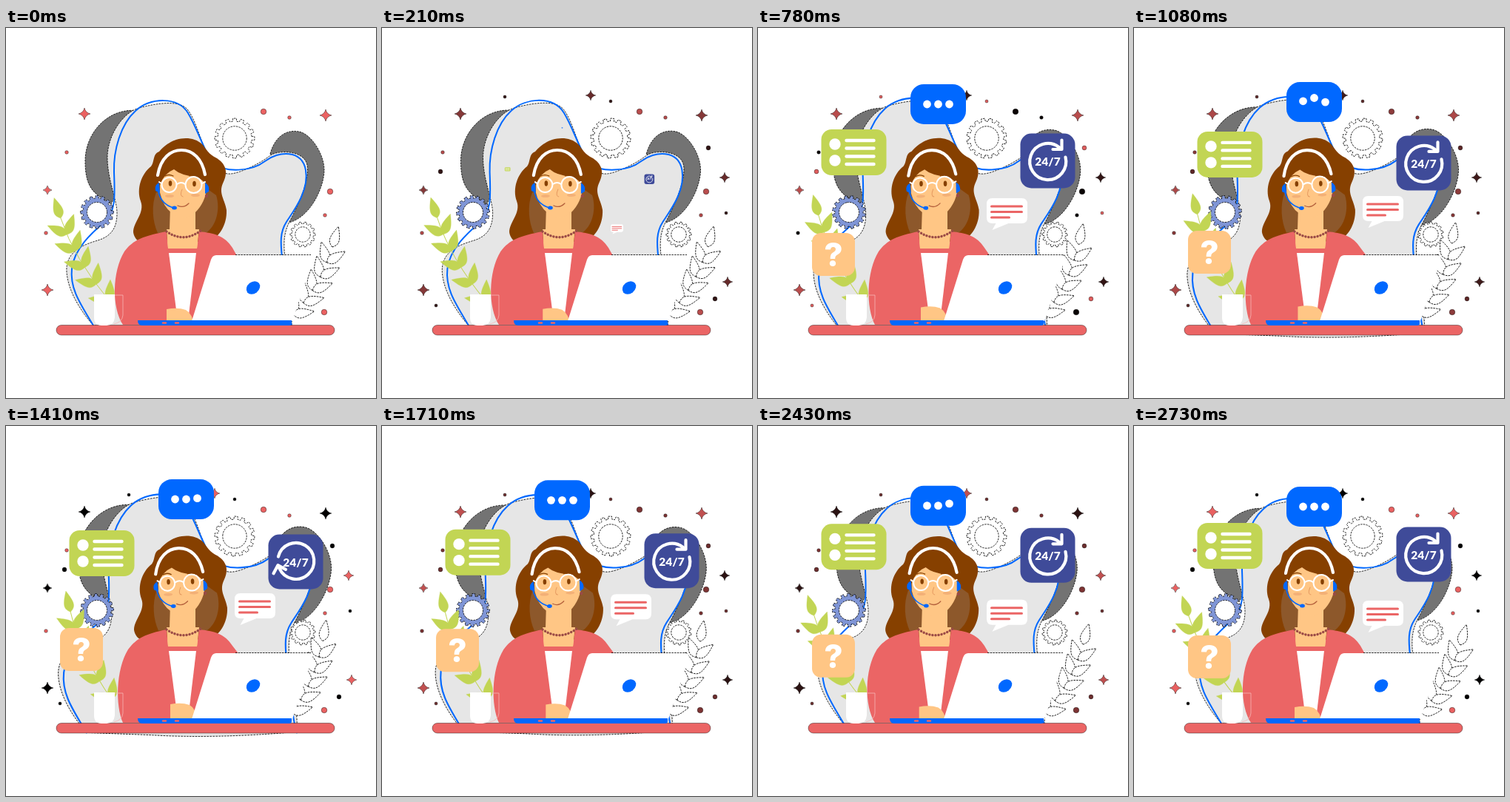
Animation, 500 px wide and 500 px high, one loop 2.76 s. Source, as an HTML page:

```html
<!DOCTYPE html>
<html lang="en">
<head>
<meta charset="utf-8">
<title>Support desk</title>
<style>
html, body { margin: 0; width: 100%; height: 100%; overflow: hidden; background: #fff; }
svg { display: block; width: 100vw; height: 100vh; }
.edge { stroke: #000; stroke-width: .8; stroke-dasharray: 2.5 1.2; }
.thin { stroke: #000; stroke-width: .4; }
.line { fill: none; stroke-linecap: round; stroke-linejoin: round; }
.card { transform-box: fill-box; }
text { fill: #fff; text-anchor: middle; }
</style>
</head>
<body>
<svg viewBox="0 0 500 500">
  <g id="blob">
    <g class="edge" fill="#737373">
      <path d="M180 112C140 106 107 140 107 180S122 225 142 238L170 180Z"/>
      <path d="M357 170C364 145 380 137 396 140S430 170 430 192S412 256 382 263L380 200Z"/>
    </g>
    <path class="edge" fill="#e6e6e6" d="M118 402C104 386 84 358 82 330S104 293 124 287S150 268 150 250S137 205 137 175S158 114 180 108S235 96 246 111S262 150 272 170S291 198 304 197S345 182 356 173S403 165 407 185S393 243 385 258S374 285 377 310S388 380 386 401Q280 410 200 405Z"/>
    <path class="line" stroke="#0068ff" stroke-width="2" d="M118 402C100 372 86 352 89 325S117 276 133 262S147 225 146 195S155 130 175 112S232 92 246 115S268 170 282 183S332 194 350 180S400 164 405 192S388 248 379 262S371 290 373 310S380 385 386 402"/>
  </g>
  <g id="sparks" class="thin"></g>
  <g id="gears" class="edge"></g>
  <g id="plantL" fill="#c2d554" stroke="#c2d554" stroke-width=".3"></g>
  <g id="plantR" class="edge" fill="#fff"></g>

  <g id="hair">
    <path fill="#864000" d="M243 149C225 149 213 160 207 167C198 170 201 181 196 187C183 197 176 217 182 234C188 250 172 262 172 276C174 290 188 294 205 294L272 288C287 286 299 266 298 246C296 232 287 224 293 210C299 198 300 186 285 176C274 171 270 163 266 158C259 151 251 149 243 149Z"/>
    <path fill="#8d582b" d="M203 222C196 240 198 262 205 277H270C284 268 290 245 284 226L270 216Z"/>
  </g>

  <g id="body">
    <path fill="#ffc685" d="M222 240H256V273L260 300H216L221 273Z"/>
    <path id="blazer" fill="#eb6565"/>
    <path fill="#ffc685" d="M217 272H261L258 298H219Z"/>
    <path fill="#fff" d="M220 304H257L246 396H232Z"/>
    <path class="line" d="M217 275Q240 291 263 274" stroke="#9a4a45" stroke-width="3.4" stroke-dasharray=".1 4"/>
  </g>

  <g id="head">
    <path fill="#ffc685" d="M208 196V222Q212 241 224 250Q239 263 255 250Q270 236 272 212L250 188H220Z"/>
    <path fill="#864000" d="M202 222C198 189 212 167 236 166C262 167 277 193 274 222Q271 206 256 201Q236 199 227 191Q214 196 208 212Z"/>
    <path class="line" d="M205 199C209 175 223 165 237 165C253 165 265 177 269 198" stroke="#fff" stroke-width="4.2"/>
    <path fill="#0068ff" d="M207 209Q200 212 202 220L208 223ZM269 209Q276 213 274 221L269 224Z"/>
    <circle cx="271" cy="227" r="2.2" fill="#9a4a45"/>
    <g fill="#f3b077"><ellipse cx="221" cy="227" rx="6" ry="2"/><ellipse cx="256" cy="226" rx="6" ry="2"/></g>
    <g fill="#864000"><ellipse cx="222" cy="210" rx="2.3" ry="3.7"/><ellipse cx="254.500" cy="210.500" rx="2.3" ry="3.7"/></g>
    <g class="line" stroke="#fff" stroke-width="2">
      <circle cx="220.500" cy="212" r="10"/><circle cx="253.500" cy="212" r="11"/>
      <path d="M231 211Q237 207 242 211M210 210L207 208M265 210L269 208"/>
    </g>
    <g class="line" stroke="#864000" stroke-width="1.3">
      <path d="M215 200Q220 197 226 200M248 200Q254 197 260 201"/>
      <path d="M232 240Q240 244 247 237" stroke="#b4603c"/>
      <path d="M238 218Q234 227 239 228" stroke="#e59a61" stroke-width="1"/>
    </g>
    <path class="line" d="M206 222Q210 238 226 243" stroke="#0068ff" stroke-width="1.6"/>
    <ellipse cx="227.500" cy="243" rx="3.4" ry="2.5" fill="#0068ff"/>
  </g>

  <path id="hand" fill="#ffc685" d="M217 380Q232 377 243 381Q252 386 254 402H217Z"/>
  <rect class="thin" x="68" y="401.500" width="376" height="13.500" rx="6.800" fill="#eb6565"/>
  <path fill="#fff" d="M284 307H410Q416 308 414 314L387 396H251L277 313Q279 307 284 307Z"/>
  <path class="edge" fill="none" d="M310 306.500H412"/>
  <ellipse cx="334" cy="351" rx="10" ry="7.800" fill="#0068ff" transform="rotate(-38 334 351)"/>
  <path fill="#0068ff" d="M178 395H386V399Q386 402 383 402H184Q178 402 178 395Z"/>
  <path class="line" d="M212 398.500H216M229 398.500H233" stroke="#eb6565" stroke-width="2.400"/>
  <path class="line" d="M147 361H158V388Q157 398 146 400" stroke="#f6b5b5" stroke-width=".8"/>
  <path fill="#fff" d="M119 360H147V391Q146 402 136 402H129Q119 402 119 391Z"/>

  <g transform="translate(336.500 252)"><g class="card" data-float="5" style="transform-origin: left bottom">
    <path fill="#fff" d="M-20 -21H20Q27.500 -21 27.500 -13V5Q27.500 13 20 13H2L-20 22L-15 13H-20Q-27.500 13 -27.500 5V-13Q-27.500 -21 -20 -21Z"/>
    <path class="line" d="M-21 -10H20M-21 -2.500H20M-21 5H3" stroke="#eb6565" stroke-width="3"/>
  </g></g>
  <g transform="translate(391.500 178.500)"><g class="card" data-float="-5" style="transform-origin: left bottom">
    <rect x="-37" y="-37" width="74" height="74" rx="15" fill="#3f4b99"/>
    <path id="ring" class="line" d="M24 -5A24.500 24.500 0 1 1 15 -18.500M19 -28V-15.500H7" stroke="#fff" stroke-width="4.200"/>
    <text y="6.500" font-family="Lato, sans-serif" font-weight="900" font-size="15.500">24/7</text>
  </g></g>
  <g transform="translate(129.500 167)"><g class="card" data-float="-5" style="transform-origin: right bottom">
    <rect x="-44" y="-31" width="88" height="62" rx="14" fill="#c2d554"/>
    <circle cx="-25.500" cy="-11" r="7.700" fill="#fff"/><circle cx="-25.500" cy="11" r="7.700" fill="#fff"/>
    <path class="line" d="M-10 -16H27M-10 -5.500H27M-10 5.500H27M-10 16H27" stroke="#fff" stroke-width="4.400"/>
  </g></g>
  <g transform="translate(243.500 104)"><g class="card" data-float="5" style="transform-origin: center bottom">
    <rect x="-37.500" y="-27" width="75" height="54" rx="18" fill="#0068ff"/>
    <g id="dots" fill="#fff"><circle cx="-15" r="5.400"/><circle r="5.400"/><circle cx="15" r="5.400"/></g>
  </g></g>
  <g transform="translate(102 307)"><g class="card" data-float="5" style="transform-origin: right top">
    <rect x="-29" y="-29" width="58" height="58" rx="12" fill="#ffc685"/>
    <text y="16" font-family="Inter, sans-serif" font-weight="800" font-size="44">?</text>
  </g></g>
</svg>
<script>
const LOOP = 2760, TAU = Math.PI * 2;
const $ = id => document.getElementById(id);
const clamp = x => Math.max(0, Math.min(1, x));
const ease = x => (1 - Math.cos(Math.PI * clamp(x))) / 2;
const set = (el, attrs) => { for (const n in attrs) el.setAttribute(n, attrs[n]); return el; };

function add(parent, tag, attrs) {
  const el = document.createElementNS('http://www.w3.org/2000/svg', tag);
  parent.appendChild(el);
  return set(el, attrs);
}

// Twinkles: two kinds, each with two groups in opposite phase
const star = r => {
  const q = r * .18;
  return `M0 ${-r}Q${q} ${-q} ${r} 0Q${q} ${q} 0 ${r}Q${-q} ${q} ${-r} 0Q${-q} ${-q} 0 ${-r}Z`;
};
const disc = r => `M${-r} 0A${r} ${r} 0 1 1 ${r} 0A${r} ${r} 0 1 1 ${-r} 0Z`;

// Larger marks come first in each list
function twinkle(spots, shape, big, small, period, flip) {
  const el = add($('sparks'), 'g', {});
  spots.split(' ').forEach((p, i) =>
    add(el, 'path', { d: shape(i < 3 ? big : small), transform: `translate(${p})` }));
  return { el, period, flip };
}
const twinkles = [
  twinkle('106,116 432,118 56,354 56,219', star, 8, 6, 920, false),
  twinkle('463,202 467,343 282,91', star, 6.8, 6, 920, true),
  twinkle('348,113 438,221 430,384 431,253 383,121 54,277 82,168', disc, 3.8, 2.3, 1380, false),
  twinkle('79,194 450,366 441,162 166,93 73,375 465,250 309,99', disc, 2.9, 2, 1380, true)
];

function gear(x, y, r, teeth, fill) {
  const el = add($('gears'), 'g', { fill }), pts = [], root = r * .85;
  for (let i = 0; i < teeth; i++)
    [[-.3, root], [-.22, r], [.22, r], [.3, root]].forEach(([o, q]) => {
      const a = (i + o) * TAU / teeth;
      pts.push(q * Math.cos(a), q * Math.sin(a));
    });
  add(el, 'path', { d: 'M' + pts.join(' ') + 'Z' });
  add(el, 'circle', { r: r * .6, fill: '#fff' });
  return { el, x, y };
}
const gears = [
  gear(309, 149, 27, 16, '#fff'),
  gear(401, 279, 17, 14, '#fff'),
  gear(123, 249, 22.5, 16, '#7f95d6')
];

// Leaf pairs along a bent stem from tip to base
function plant(g, tip, bend, base, spread) {
  const leaf = (x, y, a) => add(g, 'path', {
    d: 'M0 0C6 -8 11 -8 29 0C11 8 6 8 0 0Z'.replace(/8/g, 8.5),
    transform: `translate(${x} ${y}) rotate(${a})`
  });
  add(g, 'path', { d: `M${tip}Q${bend} ${base}`, fill: 'none', stroke: g.getAttribute('fill'), 'stroke-width': 1 });
  for (let i = 0; i <= 5; i++) {
    const u = i / 5, v = 1 - u;
    const [x, y] = [0, 1].map(j => v * v * tip[j] + 2 * u * v * bend[j] + u * u * base[j]);
    const [dx, dy] = [0, 1].map(j => v * (tip[j] - bend[j]) + u * (bend[j] - base[j]));
    const a = Math.atan2(dy, dx) * 360 / TAU;
    (i ? [-spread, spread] : [0]).forEach(s => leaf(x, y, a + s));
  }
}
plant($('plantL'), [74, 257], [92, 312], [140, 369], 42);
plant($('plantR'), [441, 296], [425, 350], [388, 387], 37);

const cards = [...document.querySelectorAll('.card')];

const blazer = k => {
  const l = 5 * k;
  return `M158 401C${143 + l} 378 ${143 + l} 330 ${160 + l} 302C${172 + l} 286 ${186 + l * .6} 281 217 275L219 298H258L261 275C281 277 296 281 306 297L${311 + 2 * k} 306V396H230L217 401Z`;
};

function draw(t) {
  const wave = Math.cos(TAU * t / LOOP), k = (1 - wave) / 2;

  set($('blob'), { transform: `translate(270 195) scale(${1 + .06 * k}) translate(-270 -195)` });

  // Marks fade from red through black and vanish at zero
  twinkles.forEach(({ el, period, flip }) => {
    const c = (1 + Math.cos(TAU * t / period)) / 2, a = flip ? 1 - c : c;
    set(el, {
      visibility: a < .003 ? 'hidden' : 'visible',
      fill: `rgb(${235 * a},${98 * a},${98 * a})`
    });
  });

  gears.forEach(({ el, x, y }, i) => set(el, {
    transform: `translate(${x} ${y}) rotate(${(i ? -360 : 360) * t / LOOP})`
  }));

  set($('plantL'), { transform: `rotate(${5.4 * k} 140 395)` });
  set($('plantR'), { transform: `rotate(${-7 * k} 390 400)` });
  set($('blazer'), { d: blazer(k) });
  set($('hair'), { transform: `translate(${k} ${-k * .6})` });
  set($('head'), { transform: `rotate(${-2 * k} 240 280)` });
  set($('hand'), { transform: `translate(${5 * k} ${-4 * k})` });

  cards.forEach((el, i) => {
    const pop = ease((t - 60 - 37 * i) / 400);
    el.style.transform = `translateY(${el.dataset.float * wave}px) scale(${pop})`;
  });

  set($('ring'), { transform: `rotate(${360 * ease((t - 1080) / 600)})` });
  [...$('dots').children].forEach((dot, i) => {
    const hop = start => Math.sin(Math.PI * clamp((t - start - 165 * i) / 300)) ** 2;
    set(dot, { cy: -8 * (hop(820) + hop(1860)) });
  });
}

const begin = performance.now();
function tick() {
  const t = (performance.now() - begin) % LOOP;
  draw(Math.floor(t / 30) * 30);
  requestAnimationFrame(tick);
}
draw(0);
requestAnimationFrame(tick);
</script>
</body>
</html>
```
